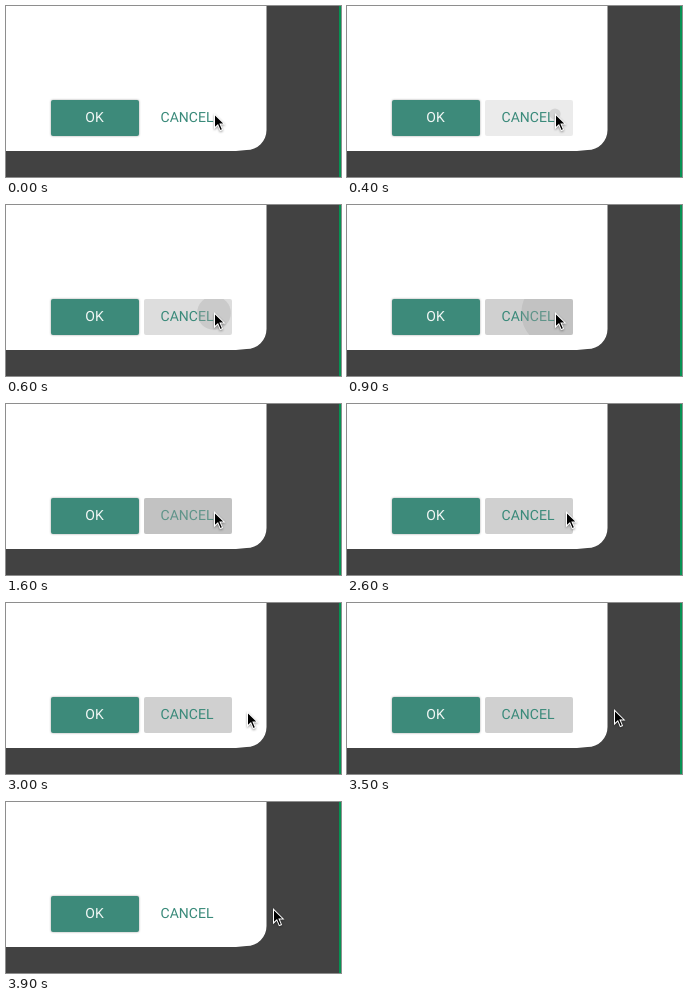
Recreate the animation shown at these times as an HTML page. Size 335 by 171 pixels, loop 4 s.

```html
<!DOCTYPE html>
<html lang="en">
<head>
<meta charset="utf-8">
<title>Dialog buttons</title>
<style>
  html, body { margin: 0; width: 100%; height: 100%; overflow: hidden; background: #424242; }
  svg { display: block; }
  text { font: 14px Roboto, sans-serif; text-anchor: middle; text-rendering: geometricPrecision; }
  #ok { filter: drop-shadow(0 .5px 1px rgba(0, 0, 0, .35)); }
  #cursor { filter: drop-shadow(0 1px 1px rgba(0, 0, 0, .4)); }
</style>
</head>
<body>
<svg width="335" height="171" viewBox="0 0 335 171">
  <defs>
    <clipPath id="clip"><rect x="138" y="94" width="88" height="36" rx="2"/></clipPath>
  </defs>
  <rect width="335" height="171" fill="#424242"/>
  <rect x="333" width="2" height="171" fill="#079253"/>
  <path d="M0 0H260.5V124A20 20 0 0 1 240.5 144L230 145H0Z" fill="#fff"/>

  <rect id="ok" x="45" y="94" width="88" height="36" rx="2" fill="#3d8a7a"/>
  <text x="88.5" y="116" fill="#f1f7f5">OK</text>

  <rect id="button" x="138" y="94" width="88" height="36" rx="2"/>
  <text x="181" y="116" fill="#3a8a7a">CANCEL</text>
  <g clip-path="url(#clip)">
    <circle id="ripple" cx="208" cy="108" fill="#a5a5a5"/>
  </g>

  <g id="cursor">
    <path d="M0 0V16.2L3.7 12.7L6 18.2L9.1 16.9L6.9 11.6H11.5Z" fill="#fff"/>
    <path d="M1 2.4V13.8L4 11L6.5 16.9L7.8 16.3L5.3 10.6H9.2Z" fill="#000"/>
  </g>
</svg>
<script>
  const LOOP = 4000, TICK = 100;
  const $ = id => document.getElementById(id);
  const mix = (a, b, p) => a + (b - a) * p;
  const progress = (t, from, to) => Math.min(1, Math.max(0, (t - from) / (to - from)));

  // time, x, y
  const path = [
    [2300, 208, 107], [2600, 219, 107], [2900, 240, 110],
    [3000, 241, 108], [3100, 241, 108], [3500, 267, 106]
  ];

  function pointer(t) {
    const next = path.findIndex(key => key[0] > t);
    if (next < 1) return path.at(next).slice(1);
    const [t0, x0, y0] = path[next - 1], [t1, x1, y1] = path[next];
    const p = progress(t, t0, t1);
    return [mix(x0, x1, p), mix(y0, y1, p)].map(Math.round);
  }

  function draw(t) {
    const pressed = t < 3600 ? progress(t, 200, 800) ** .8 : 0;
    const shade = Math.round(mix(255, 208, pressed));
    $('button').setAttribute('fill', `rgb(${shade},${shade},${shade})`);
    $('ripple').setAttribute('r', 73 * progress(t, 300, 1600));
    $('ripple').setAttribute('opacity', mix(.35, 0, progress(t, 2300, 2600)));
    $('cursor').setAttribute('transform', `translate(${pointer(t)})`);
  }

  const start = performance.now();
  function frame() {
    const t = (performance.now() - start) % LOOP;
    draw(Math.floor(t / TICK) * TICK);
    requestAnimationFrame(frame);
  }
  frame();
</script>
</body>
</html>
```
